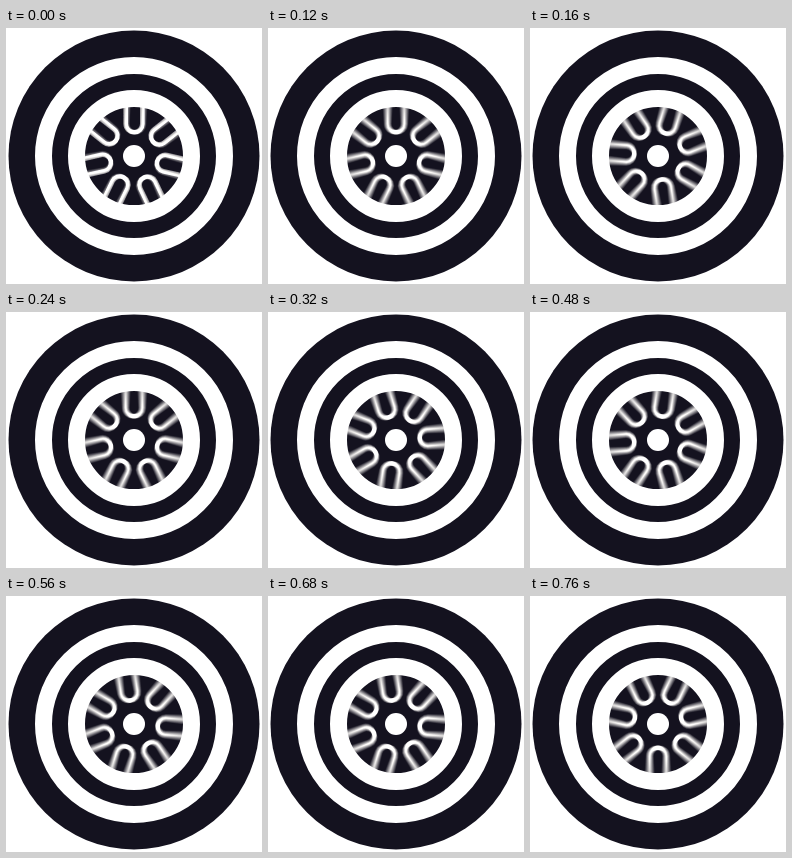
An HTML page with a canvas that plays this animation: 256 by 256 pixels, repeating every 800 ms.

```html
<!DOCTYPE html>
<html>
<head>
<meta charset="utf-8">
<style>
  html, body { margin: 0; width: 100%; height: 100%; overflow: hidden; background: #fff; }
  canvas { display: block; width: 256px; height: 256px; }
</style>
</head>
<body>
<canvas id="wheel" width="256" height="256"></canvas>
<script>
const ctx = document.getElementById('wheel').getContext('2d');
const TAU = Math.PI * 2;
const LOOP_MS = 800, FRAME_MS = 40;
const POSE_MS = 19.1, POSES = 42;   // the wheel turns in 42 poses, shown at 25 fps
const SPOKES = 7, SAMPLES = 16, SHUTTER = 0.8;
const DARK = '#14121f', DARK_TO_WHITE = '#ebede0';

function disc(radius, color) {
  ctx.fillStyle = color;
  ctx.beginPath();
  ctx.arc(0, 0, radius, 0, TAU);
  ctx.fill();
}

function ring(radius, width) {
  ctx.strokeStyle = '#fff';
  ctx.lineWidth = width;
  ctx.beginPath();
  ctx.arc(0, 0, radius, 0, TAU);
  ctx.stroke();
}

// U-shaped loops that open towards the rim
const loop = new Path2D('M-8.3 -54V-32A8.3 8.3 0 0 0 8.3 -32V-54');
const spokes = new Path2D();
for (let i = 0; i < SPOKES; i++) {
  spokes.addPath(loop, new DOMMatrix().rotate(i * 360 / SPOKES));
}

// Motion blur: average of several turns around the pose; the turn starts from rest
function drawSpokes(pose) {
  ctx.save();
  ctx.globalCompositeOperation = 'lighter';
  ctx.globalAlpha = 1 / SAMPLES;
  ctx.strokeStyle = DARK_TO_WHITE;
  ctx.lineWidth = 4.6;
  for (let i = 0; i < SAMPLES; i++) {
    const offset = ((i + 0.5) / SAMPLES - 0.5) * SHUTTER;
    ctx.save();
    ctx.rotate(Math.max(0, pose + offset) / POSES * TAU);
    ctx.stroke(spokes);
    ctx.restore();
  }
  ctx.restore();
}

function draw(now) {
  const time = Math.floor(now % LOOP_MS / FRAME_MS) * FRAME_MS;
  ctx.setTransform(1, 0, 0, 1, 0, 0);
  ctx.clearRect(0, 0, 256, 256);
  ctx.translate(128, 128);
  disc(125.5, DARK);
  drawSpokes(Math.floor(time / POSE_MS));
  ring(57.5, 17);
  ring(90.5, 17);
  disc(11, '#fff');
}

function tick() {
  draw(performance.now());
  requestAnimationFrame(tick);
}
tick();
</script>
</body>
</html>
```
